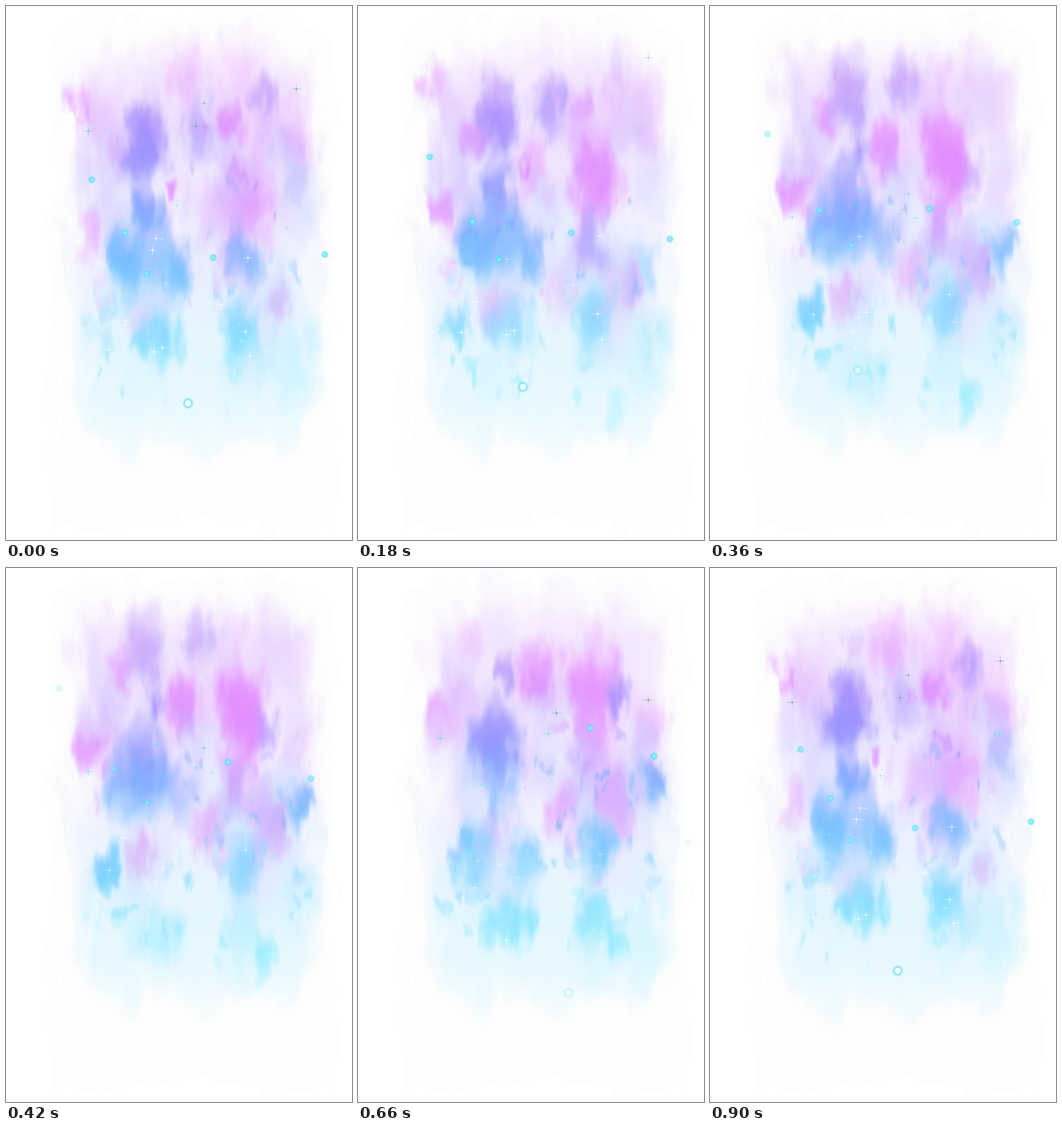
Recreate the animation shown at these times as an HTML page with a canvas. Size 587 px wide and 904 px high, loop 960 ms.

```html
<!DOCTYPE html>
<html>
<head>
<meta charset="utf-8">
<style>
html, body { margin: 0; width: 100%; height: 100%; overflow: hidden; background: #fff; }
canvas { position: absolute; left: 0; top: 0; }
#haze { filter: url(#warp); }
</style>
</head>
<body>
<svg width="0" height="0" style="position:absolute">
  <filter id="warp" x="0" y="0" width="1" height="1" color-interpolation-filters="sRGB">
    <feTurbulence type="fractalNoise" baseFrequency=".035 .012" numOctaves="3" seed="4"/>
    <feDisplacementMap in="SourceGraphic" scale="56" xChannelSelector="R" yChannelSelector="G"/>
  </filter>
</svg>
<canvas id="haze" width="587" height="904"></canvas>
<canvas id="lights" width="587" height="904"></canvas>
<script>
const W = 587, H = 904, LOOP = 960, STEP = 60;
const context = id => document.getElementById(id).getContext('2d');
const haze = context('haze'), lights = context('lights');
const mask = Object.assign(document.createElement('canvas'), { width: W, height: H }).getContext('2d');

let seed = 11;
const random = (a = 0, b = 1) => {
  seed = (seed * 16807) % 2147483647;
  return a + (b - a) * seed / 2147483647;
};
const times = (n, make) => Array.from({ length: n }, make);
const clamp = v => Math.max(0, Math.min(1, v));

// Everything rises, faster the higher it gets.
const rise = (y, dt, rate) => 1100 - (1100 - y) * Math.exp(rate * dt);

// Calls draw(dt, strength) for each living copy of something centred on time `mid`.
function living(t, mid, half, draw) {
  for (let k = -2; k <= 2; k++) {
    const dt = t - mid + k * LOOP, u = dt / half;
    if (Math.abs(u) < 1) draw(dt, 1 - u * u);
  }
}

// A plume is an ellipse; wider ones live longer.
const plume = (alpha, [mid, x, y, r]) => ({ mid, x, y, r, alpha, half: 300 + 6 * r });
const scatter = (n, top, bottom, rMin, rMax, alpha) => times(n, () => plume(random(.4, 1) * alpha,
  [random(0, LOOP), random(140, 500), random(top, bottom), random(rMin, rMax)]));

// Main plumes: time, x, y, radius
const cool = [
  [340, 235, 360, 62], [0, 230, 235, 46], [240, 240, 160, 52], [0, 235, 340, 32],
  [0, 195, 445, 44], [0, 285, 450, 40], [800, 268, 580, 40], [850, 228, 580, 27],
  [700, 402, 463, 42], [860, 400, 565, 42], [540, 438, 645, 30], [360, 172, 520, 28],
  [560, 250, 198, 26], [780, 440, 190, 29], [330, 325, 135, 40], [540, 495, 380, 30]
].map(row => plume(.88, row));
const pink = [
  [290, 405, 285, 60], [300, 392, 385, 44], [0, 383, 202, 30], [850, 312, 130, 44],
  [360, 195, 185, 30], [0, 127, 168, 24], [240, 140, 340, 30], [60, 281, 293, 17],
  [540, 440, 420, 48], [540, 345, 425, 42], [600, 395, 190, 62], [540, 300, 205, 44],
  [360, 230, 490, 34], [150, 462, 480, 28]
].map(row => plume(.75, row));
const coolField = [...scatter(20, 150, 600, 35, 60, .25), ...scatter(46, 270, 650, 7, 13, .6)];
const pinkField = [...scatter(16, 120, 560, 30, 50, .28), ...scatter(16, 180, 520, 8, 14, .5)];

// Vertical colour ramps, evenly spaced from y = 60 to y = 740
const coolRamp = ['#e6d2fd', '#c6a6fb', '#a88ffc', '#8c8eff', '#76a8ff', '#70bcff', '#74d0ff', '#84e4ff', '#96eeff', '#a8ecff'];
const pinkRamp = ['#f4dcfd', '#eaacff', '#e284ff', '#de82ff', '#e290ff', '#e4a6fb', '#dcb4fb', '#e2c8fb', '#ead8fb', '#f0e4fd'];
const baseRamp = ['#faf2ff', '#f4e7fe', '#f1e3ff', '#f4ecff', '#f3f0ff', '#ecf0ff', '#e4f2ff', '#e0f5ff', '#e4f7ff', '#ecfaff'];

function blob(x, y, rx, ry, alpha) {
  mask.save();
  mask.translate(x, y);
  mask.scale(rx, ry);
  const g = mask.createRadialGradient(0, 0, 0, 0, 0, 1);
  [1, .95, .8, .5, .18, 0].forEach((a, i) => g.addColorStop(i / 5, `rgba(0,0,0,${a * alpha})`));
  mask.fillStyle = g;
  mask.fillRect(-1, -1, 2, 2);
  mask.restore();
}

function drawPlumes(plumes, t) {
  for (const p of plumes)
    living(t, p.mid, p.half, (dt, strength) => {
      const y = rise(p.y, dt, .00024), thin = clamp((y - 30) / 90);
      blob(p.x, y, p.r, p.r * 1.75, p.alpha * strength * thin);
    });
}

// Paints an opacity mask, then colours it with a vertical ramp.
function layer(ramp, paint) {
  mask.globalCompositeOperation = 'source-over';
  mask.clearRect(0, 0, W, H);
  paint();
  const g = mask.createLinearGradient(0, 60, 0, 740);
  ramp.forEach((color, i) => g.addColorStop(i / (ramp.length - 1), color));
  mask.globalCompositeOperation = 'source-in';
  mask.fillStyle = g;
  mask.fillRect(0, 0, W, H);
  haze.drawImage(mask.canvas, 0, 0);
}

// Pale body with a scalloped top and dripping bottom
function silhouette(t, grow, alpha) {
  const turn = t / LOOP * 2 * Math.PI, left = 128 - grow, right = 514 + grow;
  const lift = 9 * (1 - Math.cos(turn));
  const edge = x => Math.abs((x - 321) / 200);
  mask.save();
  mask.filter = 'blur(7px)';
  mask.fillStyle = `rgba(0,0,0,${alpha})`;
  mask.beginPath();
  for (let x = left; x <= right; x += 4)
    mask.lineTo(x, 70 - grow - 11 * Math.cos((x - 310 - 10 * Math.sin(turn)) / 11.1) + 40 * edge(x) ** 2.5);
  for (let x = right; x >= left; x -= 4)
    mask.lineTo(x, 738 + grow - lift + 17 * Math.cos((x - 200) / 22.3) + 9 * Math.cos((x - 270) / 11) - 60 * edge(x) ** 6);
  mask.fill();
  mask.restore();
}

function backdrop() {
  haze.fillStyle = '#fff';
  haze.fillRect(0, 0, W, H);
  haze.fillStyle = '#fdfdfd';
  haze.beginPath();
  haze.roundRect(80, 22, 475, 840, [50, 50, 0, 0]);
  haze.rect(80, 862, 115, 24);
  haze.rect(440, 862, 115, 24);
  haze.fill();
}

// Brightest crosses: x, y at time zero, middle of life
const crosses = [
  [254, 393, 180], [248, 413, 60], [265, 578, 150], [251, 585, 0], [410, 426, 80], [406, 551, 150],
  [413, 592, -20], [175, 581, 100], [202, 532, 160], [365, 505, -100], [492, 140, -160], [322, 203, -260],
  [336, 164, -340], [139, 211, -300]
].map(([x, y, mid]) => ({ x, y: rise(y, mid, .0003), mid, half: 480, size: 1.5, arm: 8, alpha: 1 }));
const twinkles = times(150, () => ({
  x: random(135, 515), y: 270 + 440 * Math.sqrt(random()), mid: random(0, LOOP), half: random(120, 360),
  size: random(.5, 1.3), arm: random() < .25 ? random(3, 7) : 0, alpha: .75
}));

const tint = y => y < 130 ? '#a98ad8' : y < 270 ? '#5aaeb0' : y < 385 ? '#5ee6d8' : '#fff';

function sparkle(x, y, size, arm, alpha) {
  x = Math.round(x);
  y = Math.round(y);
  lights.fillStyle = tint(y);
  lights.globalAlpha = alpha * .4;
  for (const reach of [arm, arm / 2 | 0]) {
    if (!reach) continue;
    lights.fillRect(x - reach, y, 2 * reach + 1, 1);
    lights.fillRect(x, y - reach, 1, 2 * reach + 1);
  }
  lights.globalAlpha = alpha;
  lights.beginPath();
  lights.arc(x + .5, y + .5, size, 0, 7);
  lights.fill();
}

// Drifting orbs: time, x, y, then speed in px/ms
const orbs = [
  [30, 304, 668, -.161, -.155], [80, 135, 277, -.133, -.215], [150, 195, 368, -.045, -.105],
  [150, 239, 433, .004, -.131], [60, 355, 412, .058, -.235], [540, 385, 300, .07, -.242],
  [60, 537, 412, -.065, -.145], [600, 506, 328, -.063, -.158]
];

function orb(x, y, alpha) {
  const low = clamp((y - 560) / 60), r = 7 + 3 * low;
  const g = lights.createRadialGradient(x, y, 0, x, y, r);
  g.addColorStop(0, low ? '#fff' : '#b8fbff');
  g.addColorStop(.2 + .25 * low, low ? '#fff' : '#86f2fa');
  g.addColorStop(.6, 'rgba(90,222,246,.8)');
  g.addColorStop(1, 'rgba(90,222,246,0)');
  lights.globalAlpha = alpha;
  lights.fillStyle = g;
  lights.fillRect(x - r, y - r, 2 * r, 2 * r);
}

function render(t) {
  backdrop();
  layer(baseRamp, () => {
    silhouette(t, 14, .45);
    silhouette(t, -6, .75);
    for (const x of [104, 531]) blob(x, 410, 10, 130, .5);
  });
  layer(pinkRamp, () => { drawPlumes(pinkField, t); drawPlumes(pink, t); });
  layer(coolRamp, () => { drawPlumes(coolField, t); drawPlumes(cool, t); });

  lights.clearRect(0, 0, W, H);
  for (const s of [...twinkles, ...crosses])
    living(t, s.mid, s.half, (dt, strength) =>
      sparkle(s.x, rise(s.y, dt, .0003), s.size, s.arm, s.alpha * strength));
  for (const [mid, x, y, vx, vy] of orbs)
    living(t, mid, 400, (dt, strength) => orb(x + vx * dt, y + vy * dt, strength));
}

let start, shown = -1;
function tick(now) {
  start ??= now;
  const t = Math.floor((now - start) % LOOP / STEP) * STEP;
  if (t !== shown) render(shown = t);
  requestAnimationFrame(tick);
}
render(0);
requestAnimationFrame(tick);
</script>
</body>
</html>
```
